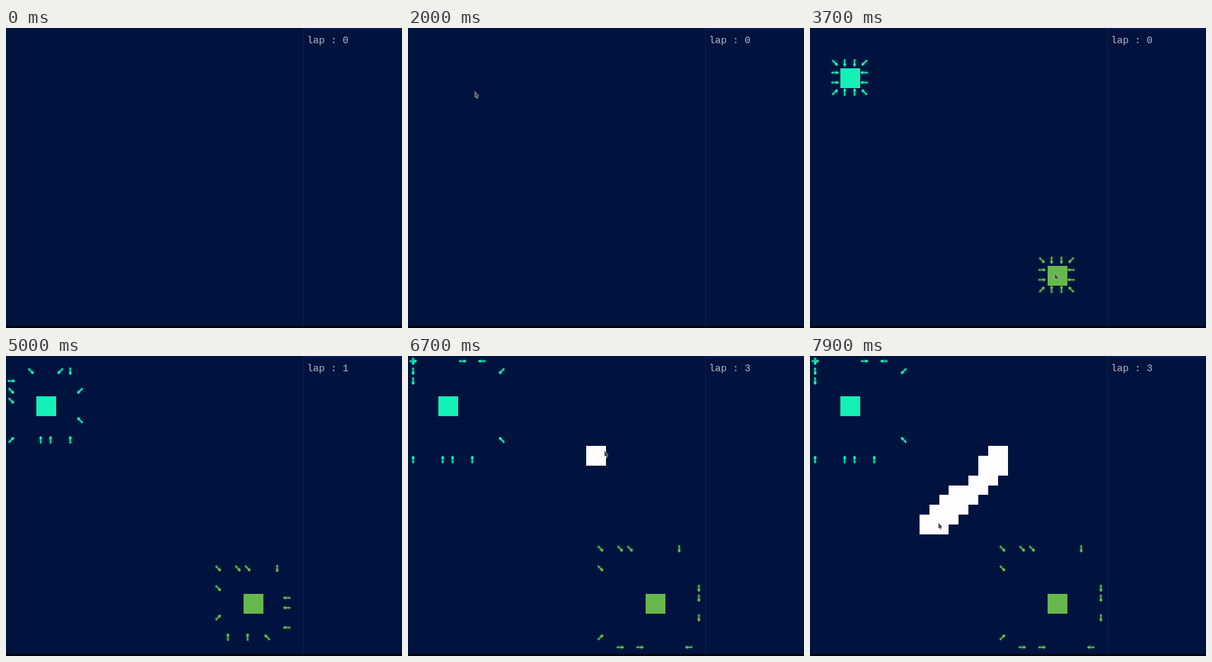
An HTML page with a canvas for the animation above (8000 ms loop, 600 by 454 pixels).

```html
<!DOCTYPE html>
<html lang="en">
<head>
<meta charset="utf-8">
<title>Ant nests</title>
<style>
  html, body { margin: 0; width: 100%; height: 100%; overflow: hidden; background: #000; }
  canvas { display: block; }
</style>
</head>
<body>
<canvas id="stage" width="600" height="454"></canvas>
<script>
const ctx = document.getElementById('stage').getContext('2d');
const LOOP = 8000, TICK = 100, GRID = 30, CELL = 14.95, EDGE = 1.2;
const FONT = '15px "Liberation Mono", "Courier New", monospace';
const STEP_TIMES = [4400, 5000, 5500, 5800];

// Each letter is one ant, clockwise from the nest's top left corner:
// on its second step it bends left, keeps straight on, or bends right.
const nests = [
  { col: 3, row: 4, born: 2300, color: '#14f0b6', bends: 'LLRLLRRSSSRR' },
  { col: 24, row: 24, born: 3700, color: '#66b84c', bends: 'SLLLSSLLSLLR' },
];

// Key points: time, x, y. The pointer is hidden between its tracks.
const pointerTracks = [
  [[200, 594, 421], [300, 594, 421]],
  [[1300, 450, 403], [2000, 101, 96], [2500, 58, 74], [2700, 243, 195],
   [3100, 371, 366], [3700, 370, 371], [4300, 585, 4]],
  [[5600, 495, 50], [5900, 413, 110], [6300, 413, 110], [6700, 297, 143],
   [7100, 270, 194], [7700, 193, 268], [7900, 194, 252], [8000, 194, 252]],
];
// The brush moves in grid cells and paints a 2 x 2 block.
const brushTrack = [[6700, 18, 9], [6900, 17, 11], [7200, 15, 13], [7600, 11, 16]];

function along(track, t) {
  const i = Math.max(1, track.findIndex(key => key[0] >= t));
  const [t0, x0, y0] = track[i - 1], [t1, x1, y1] = track[i];
  const p = (t - t0) / (t1 - t0);
  return [x0 + (x1 - x0) * p, y0 + (y1 - y0) * p];
}

function fillBlock(col, row) {
  const at = n => Math.round(EDGE + n * CELL);
  ctx.fillRect(at(col), at(row), at(col + 2) - at(col), at(row + 2) - at(row));
}

function dot(x, y, rx, ry) {
  ctx.beginPath();
  ctx.ellipse(x, y, rx, ry, 0, 0, Math.PI * 2);
  ctx.fill();
}

function drawAnt({ x, y, heading }) {
  const center = n => 0.3 + 14.93 * (n + 0.5);
  ctx.save();
  ctx.translate(center(x), center(y));
  ctx.rotate(heading * Math.PI / 4);
  dot(0, -3.6, 1.5, 1.6);
  dot(0, 0, 1, 2.6);
  dot(0, 3.3, 2, 2.4);
  ctx.globalAlpha = 0.55;
  ctx.lineWidth = 0.6;
  ctx.beginPath();
  for (const side of [-1, 1]) {
    ctx.moveTo(side * 0.6, -4.5);
    ctx.lineTo(side * 2, -6);
    for (const k of [-1, 0, 1]) {
      ctx.moveTo(0, k);
      ctx.lineTo(side * 3.6, k * 3);
    }
  }
  ctx.stroke();
  ctx.restore();
}

// Headings are eighths of a turn, clockwise from north.
function ahead(x, y, heading) {
  const angle = heading * Math.PI / 4;
  return [x + Math.round(Math.sin(angle)), y - Math.round(Math.cos(angle))];
}

const inGrid = cell => cell.every(n => n >= 0 && n < GRID);

// Blocked ants try ever wider turns, the side towards north first.
function freeHeading(x, y, heading) {
  const side = heading % 8 < 4 ? -1 : 1;
  for (let turn = 0; turn < 4; turn++) {
    for (const h of [heading + side * turn, heading - side * turn]) {
      if (inGrid(ahead(x, y, h))) return h;
    }
  }
}

// Ants are born on the ring of twelve cells around the nest, facing away.
function newAnt(nest, n) {
  const side = Math.floor(n / 3), k = n % 3;
  const [dx, dy] = [[k - 1, -1], [2, k - 1], [2 - k, 2], [-1, 2 - k]][side];
  return { x: nest.col + dx, y: nest.row + dy, heading: side * 2 + (k ? 8 : 7) };
}

function walk(ant, bend, steps) {
  for (let step = 1; step <= steps; step++) {
    if (step === 2) ant.heading += 'LSR'.indexOf(bend) - 1;
    ant.heading = freeHeading(ant.x, ant.y, ant.heading);
    [ant.x, ant.y] = ahead(ant.x, ant.y, ant.heading);
  }
  return ant;
}

function drawNest(nest, steps) {
  ctx.fillStyle = ctx.strokeStyle = nest.color;
  fillBlock(nest.col, nest.row);
  [...nest.bends].forEach((bend, n) => drawAnt(walk(newAnt(nest, n), bend, steps)));
}

function drawWall(t) {
  const start = brushTrack[0][0], end = brushTrack[brushTrack.length - 1][0];
  ctx.fillStyle = '#fffdfe';
  for (let time = start; time <= Math.min(t, end); time += 10) {
    const [x, y] = along(brushTrack, time);
    fillBlock(Math.ceil(x - 0.5), Math.round(y));
  }
}

function drawPointer(t) {
  const track = pointerTracks.find(keys => t >= keys[0][0] && t < keys[keys.length - 1][0]);
  if (!track) return;
  const [x, y] = along(track, t);
  ctx.save();
  ctx.translate(Math.round(x) + 0.5, Math.round(y) + 0.5);
  ctx.fillStyle = '#454548';
  ctx.strokeStyle = '#b9b9b4';
  ctx.lineWidth = 0.8;
  const arrow = new Path2D('M0 0V8.5L2 7.5 3.6 10.5 4.6 9.5 4 7.4 5.8 6Z');
  ctx.fill(arrow);
  ctx.stroke(arrow);
  ctx.restore();
}

function drawBoard(lap) {
  ctx.fillStyle = '#000';
  ctx.fillRect(0, 0, 600, 454);
  ctx.fillStyle = '#00133e';
  ctx.fillRect(0, 0, 600, 451.5);
  ctx.fillStyle = '#052768';
  ctx.fillRect(450.5, 1, 1, 450);
  ctx.fillRect(450.5, 1, 150, 1);
  ctx.fillStyle = '#b4b9c6';
  ctx.font = FONT;
  ctx.fillText('lap : ' + lap, 456, 23);
}

function draw(now) {
  const t = Math.floor(now % LOOP / TICK) * TICK;
  const steps = STEP_TIMES.filter(time => t >= time).length;
  drawBoard(Math.max(0, steps - 1));
  nests.filter(nest => t >= nest.born).forEach(nest => drawNest(nest, steps));
  drawWall(t);
  drawPointer(t);
}

function loop() {
  draw(performance.now());
  requestAnimationFrame(loop);
}
loop();
</script>
</body>
</html>
```
